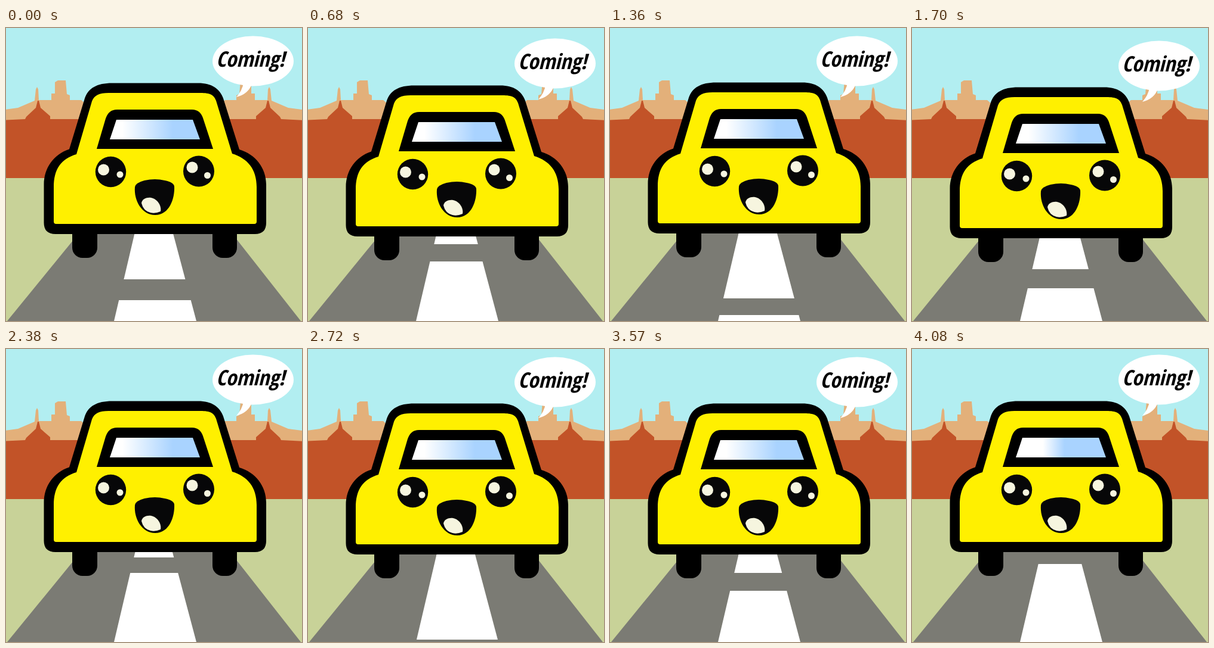
Recreate the animation shown at these times as an HTML page. Size 496x492 px, loop 4.25 s.

```html
<!DOCTYPE html>
<html lang="en">
<head>
<meta charset="utf-8">
<title>Coming!</title>
<style>
  html, body { margin: 0; width: 100%; height: 100%; overflow: hidden; }
  svg { display: block; width: 496px; height: 492px; }
  text { font: italic 700 41px "Open Sans Condensed", "Roboto Condensed", "Open Sans", sans-serif; font-stretch: 75%; }
</style>
</head>
<body>
<svg viewBox="0 0 496 492">
  <defs>
    <linearGradient id="glass">
      <stop offset=".14" stop-color="#fff"/>
      <stop offset=".7" stop-color="#a9d3ff"/>
    </linearGradient>
    <g id="skyline">
      <path fill="#e3b07a" d="M-10 160V138L20 134 48 122 50 103 52 99 54 103 55 121H76V110H82V91L87 88H100L102 111 107 113V121H126L140 133H250V160Z"/>
      <path fill="#c25328" d="M-10 252V155L32 153 34 149 50 134 53 122H55L58 134 74 148V153H250V252Z"/>
    </g>
  </defs>

  <rect width="496" height="492" fill="#b2eef1"/>
  <use href="#skyline"/>
  <use href="#skyline" transform="matrix(-1 0 0 1 493 0)"/>
  <rect y="252" width="496" height="240" fill="#c8d298"/>

  <path fill="#7b7b74" d="M2 492 134 330H367L494 492Z"/>
  <path fill="#fff" d="M219 330H276L319 492H181Z"/>
  <rect id="gap" x="175" width="150" fill="#7b7b74"/>

  <g id="car">
    <rect x="111" y="320" width="42" height="61" rx="17"/>
    <rect x="346" y="320" width="41" height="61" rx="17"/>
    <path d="M63.500 322V258C63.500 230 80 207 106 198.500L132 113C138 96 152 87.500 178 87.500H322C345 87.500 358 97 364 113L391 199C418 207 436 230 436 258V322Q436 341 417 341H83Q63.500 341 63.500 322Z"/>
    <path fill="#fff000" d="M80 320V262C80 232 92 215 118 207L144 118C148 108 156 104 172 104H326C342 104 348 107 352 117L379 206C405 214 420 232 420 262V320Q420 324 416 324H84Q80 324 80 320Z"/>
    <path d="M152 198 167 147Q172 132 186 132H312Q325 132 330 146L347 198Z"/>
    <path fill="url(#glass)" d="M185 149H313L325 182H174Z"/>
    <g fill="#070708">
      <circle cx="175.500" cy="236.500" r="25.700"/>
      <circle cx="323" cy="235.500" r="26"/>
      <path d="M216 262Q217 255 232 251 250 247 266 251 281 254 282 261C283 281 274 309 250 309 228 309 214 285 216 262Z"/>
    </g>
    <g fill="#f6f5df">
      <circle cx="163.500" cy="233" r="9.500"/>
      <circle cx="191" cy="241" r="5.500"/>
      <circle cx="312" cy="229" r="9.500"/>
      <circle cx="337.500" cy="242.500" r="5.500"/>
      <path d="M227 289C228 282 236 279 243 280 254 282 261 294 259 303Q250 307 242 305 230 302 227 289Z"/>
    </g>
  </g>

  <g id="bubble">
    <ellipse cx="414" cy="51.500" rx="68" ry="42" fill="#fff"/>
    <path fill="#fff" d="M398 88Q396 101 386 112 406 107 412 90Z"/>
    <text id="word" x="409.500" y="61" text-anchor="middle">Coming!</text>
  </g>
</svg>
<script>
  const STEP = 170, STEPS = 25;
  const bounce = [5, 8, 12, 12, 9, 4, 1, 0, 4, 8, 12, 12, 8, 4, 0, 1, 4, 8, 12, 12, 8, 4, 0, 0, 0];
  // Gap between the road dashes: [top, bottom], receding over nine steps
  const gaps = [[422, 457], [405, 437], [390, 421], [376, 406], [363, 392],
                [350, 376], [337, 361], [488, 514], [454, 482]];
  const get = id => document.getElementById(id);
  const [car, bubble, gap, word] = ["car", "bubble", "gap", "word"].map(get);
  const [white, blue] = get("glass").children;

  // Choose the font size that fits the bubble
  word.style.fontSize = Math.min(41, 41 * 115 / word.getComputedTextLength()) + "px";

  function draw(now) {
    const step = Math.floor(now / STEP) % STEPS;
    const y = bounce[step];
    const [top, bottom] = gaps[step % 9];
    const last = step === STEPS - 1;
    car.setAttribute("transform", `translate(0 ${y})`);
    bubble.setAttribute("transform", `translate(0 ${4 * Math.round(y / 4)})`);
    gap.setAttribute("y", top);
    gap.setAttribute("height", bottom - top);
    white.setAttribute("offset", last ? .3 : .14);
    blue.setAttribute("offset", last ? .54 : .7);
    requestAnimationFrame(() => draw(performance.now()));
  }
  draw(0);
</script>
</body>
</html>
```
